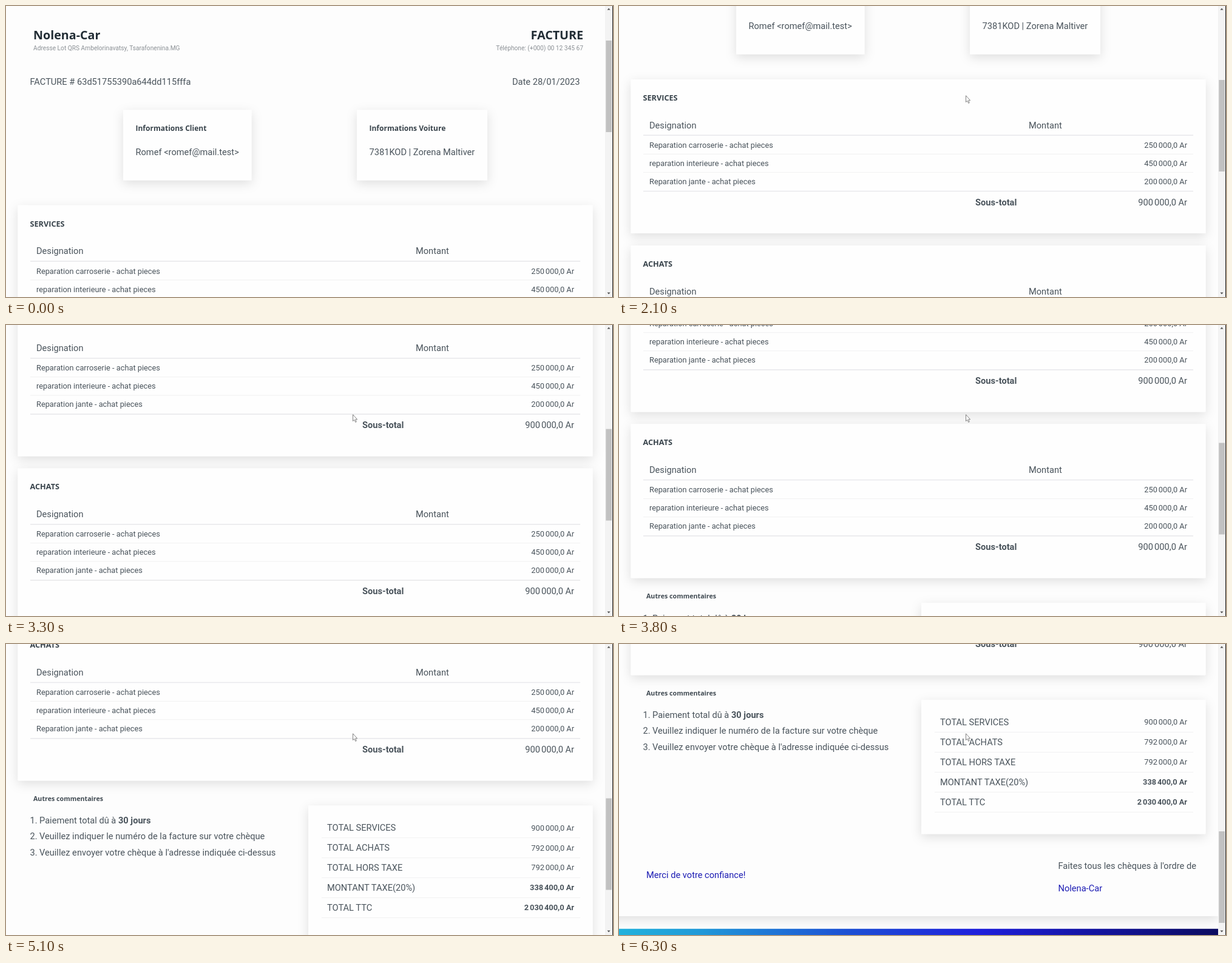
An HTML page that plays this animation: 1000 px wide and 480 px high, repeating every 7100 ms.

```html
<!DOCTYPE html>
<html lang="fr">
<head>
<meta charset="utf-8">
<title>Facture</title>
<style>
  html, body { margin: 0; width: 100%; height: 100%; overflow: hidden; background: #fdfdfd; }
  svg { display: block; width: 100vw; height: 100vh; }
  text { font: 14.64px Roboto, sans-serif; fill: #4a545c; white-space: pre; }
  .b { font-weight: 700; }
  .row { font-size: 12.81px; }
  .small { font-size: 10.2px; fill: #8b9095; }
  .title, .head, .note, .card { font-family: "Open Sans", sans-serif; font-weight: 700; }
  .title { font-size: 19.7px; fill: #222d35; }
  .head { font-size: 12.7px; fill: #38434b; }
  .card { font-size: 12px; fill: #38434b; }
  .note { font-size: 10.7px; fill: #414b53; }
  .blue { fill: #1d1db4; }
</style>
</head>
<body>
<svg viewBox="0 0 1000 480" preserveAspectRatio="none">
  <defs>
    <filter id="shade" filterUnits="userSpaceOnUse" x="-60" y="-60" width="1120" height="1400">
      <feDropShadow dx="0" dy="5" stdDeviation="9" flood-color="#000" flood-opacity=".12"/>
    </filter>
    <linearGradient id="bar">
      <stop offset="0" stop-color="#22b2dc"/>
      <stop offset=".13" stop-color="#209ad8"/>
      <stop offset=".38" stop-color="#1c50d4"/>
      <stop offset=".6" stop-color="#1f1fdc"/>
      <stop offset=".78" stop-color="#1414a4"/>
      <stop offset="1" stop-color="#0b0b60"/>
    </linearGradient>
  </defs>
  <rect width="1000" height="480" fill="#fdfdfd"/>
  <g id="page"></g>
  <rect x="987.5" width="12.5" height="480" fill="#f3f3f3"/>
  <rect id="thumb" x="988.3" y="57" width="9.7" height="151" fill="#c1c1c1"/>
  <path d="M990.5 6.5h5l-2.5-3zM990.5 472.5h5l-2.5 3z" fill="#505050"/>
  <rect x="999" width="1" height="480" fill="#1c1c1c"/>
  <path id="cursor" d="M571.5 147.8v10.8l2.4-2.2 1.8 4 1.6-.7-1.7-3.9h3.1z" fill="#fff" stroke="#777" stroke-width=".9"/>
</svg>
<script>
const $ = id => document.getElementById(id);
const LOOP = 7100, STEP = 100, CLICK = 73.24, EASE_MS = 250;
// Wheel clicks: when each scroll begins
const CLICKS = [720, 1357, 1920, 2457, 3020, 3457, 3957, 4538, 4957, 5495, 5957];

const safe = s => s.replace(/&/g, '&amp;').replace(/</g, '&lt;').replace(/>/g, '&gt;');
const text = (x, y, s, cls = '', end = false) =>
  `<text x="${x}" y="${y}" class="${cls}"${end ? ' text-anchor="end"' : ''}>${safe(s)}</text>`;
const line = (x, y, w, h, color) =>
  `<rect x="${x}" y="${y - h / 2}" width="${w}" height="${h}" fill="${color}"/>`;
const box = (x, y, w, h) =>
  `<rect x="${x}" y="${y}" width="${w}" height="${h}" rx="1" fill="#fefefe" filter="url(#shade)"/>`;

// Amount with thin gaps between the thousands
function amount(y, value, cls = '') {
  const [first, ...rest] = value.split(' ');
  const tail = rest.map(s => `<tspan dx=".15em">${s}</tspan>`).join('');
  return `<text x="936" y="${y}" class="${cls}" text-anchor="end">${first}${tail}<tspan> Ar</tspan></text>`;
}

function table(dy, name) {
  const rows = [
    ['Reparation carroserie - achat pieces', '250 000,0'],
    ['reparation interieure - achat pieces', '450 000,0'],
    ['Reparation jante - achat pieces', '200 000,0']
  ];
  let out = box(19.5, 328.8, 947, 254)
    + text(39.5, 363.7, name, 'head')
    + text(50, 409.4, 'Designation') + text(675, 409.4, 'Montant')
    + line(40, 421, 906, 1.6, '#e9e9ec');
  rows.forEach(([label, value], i) => {
    const y = 441.5 + i * 30.1;
    out += text(50, y, label, 'row') + amount(y, value, 'row');
    if (i < 2) out += line(40, 452 + i * 30.2, 906, 1, '#f1f1f2');
  });
  out += line(40, 513.3, 906, 1.6, '#e9e9ec')
    + text(587, 536.4, 'Sous-total', 'b') + amount(536.4, '900 000,0');
  return `<g transform="translate(0 ${dy})">${out}</g>`;
}

function totals() {
  const rows = [
    ['TOTAL SERVICES', '900 000,0'],
    ['TOTAL ACHATS', '792 000,0'],
    ['TOTAL HORS TAXE', '792 000,0'],
    ['MONTANT TAXE(20%)', '338 400,0'],
    ['TOTAL TTC', '2 030 400,0']
  ];
  return box(498, 898, 468.5, 221) + rows.map(([label, value], i) => {
    const y = 939.7 + i * 32.95;
    return text(529, y, label) + amount(y - .6, value, i > 2 ? 'row b' : 'row')
      + line(520, y + 11.5, 426, 1, '#f1f1f2');
  }).join('');
}

$('page').innerHTML =
  '<rect x="-20" y="-40" width="1007" height="1294.6" fill="#fdfdfd" filter="url(#shade)"/>'
  + '<rect y="1275.4" width="987" height="40" fill="url(#bar)"/>'
  + text(45, 55, 'Nolena-Car', 'title')
  + text(951, 55, 'FACTURE', 'title', true)
  + text(45, 73.4, 'Adresse Lot QRS Ambelorinavatsy, Tsarafonenina.MG', 'small')
  + text(951, 73.4, 'Téléphone: (+000) 00 12 345 67', 'small', true)
  + text(39.5, 130, 'FACTURE # 63d51755390a644dd115fffa')
  + text(945.5, 130, 'Date 28/01/2023', '', true)
  + box(193, 171.5, 211.5, 116) + box(578, 171.5, 215, 116)
  + text(213.5, 206.3, 'Informations Client', 'card')
  + text(213.5, 246, 'Romef <romef@mail.test>')
  + text(598.5, 206.3, 'Informations Voiture', 'card')
  + text(598.5, 246, '7381KOD | Zorena Maltiver')
  + table(0, 'SERVICES') + table(274, 'ACHATS')
  + text(45, 890.4, 'Autres commentaires', 'note')
  + `<text x="39.5" y="928">1. <tspan x="55">Paiement total dû à </tspan><tspan class="b">30 jours</tspan></text>`
  + text(39.5, 954, '2.') + text(55, 954, 'Veuillez indiquer le numéro de la facture sur votre chèque')
  + text(39.5, 980.2, '3.') + text(55, 980.2, "Veuillez envoyer votre chèque à l'adresse indiquée ci-dessus")
  + totals()
  + text(45, 1191.2, 'Merci de votre confiance!', 'blue')
  + text(723.5, 1176.2, "Faites tous les chèques à l'ordre de")
  + text(723.5, 1213.2, 'Nolena-Car', 'blue');

// cubic-bezier(.42, 0, .58, 1)
function ease(x) {
  if (x <= 0) return 0;
  if (x >= 1) return 1;
  let lo = 0, hi = 1, u;
  for (let i = 0; i < 20; i++) {
    u = (lo + hi) / 2;
    const px = 3 * (1 - u) * u * (.42 * (1 - u) + .58 * u) + u ** 3;
    if (px < x) lo = u; else hi = u;
  }
  return u * u * (3 - 2 * u);
}

function draw(now) {
  const t = Math.floor((now % LOOP) / STEP) * STEP;
  const scroll = CLICK * CLICKS.reduce((sum, start) => sum + ease((t - start) / EASE_MS), 0);
  $('page').setAttribute('transform', `translate(0 ${-scroll.toFixed(2)})`);
  $('thumb').setAttribute('y', (57 + scroll * .3128).toFixed(2));
  $('cursor').setAttribute('visibility', t < 800 ? 'hidden' : 'visible');
}

const begin = performance.now();
function tick() {
  draw(performance.now() - begin);
  requestAnimationFrame(tick);
}
tick();
</script>
</body>
</html>
```
